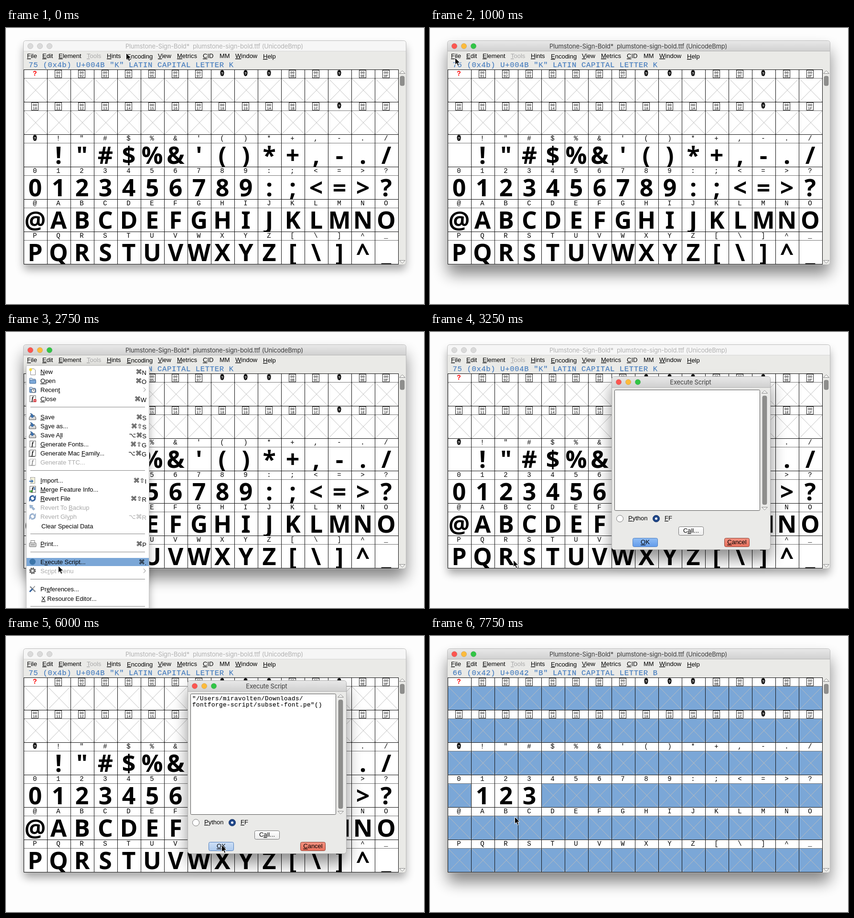
Write an HTML page that moves like this. It is 875 px wide and 579 px high and loops after 8000 ms.

```html
<!DOCTYPE html>
<html lang="en">
<head>
<meta charset="utf-8">
<title>Font subset demo</title>
<style>
html, body { margin: 0; width: 100%; height: 100%; overflow: hidden; background: #fdfdfd; }
svg { display: block; width: 875px; height: 579px; }
text { font: 13px "Liberation Sans", Arial, "DejaVu Sans", sans-serif; white-space: pre; }
.title { font: 13px Inter, Roboto, sans-serif; letter-spacing: -.18px; text-anchor: middle; }
.mono { font-family: "Liberation Mono", monospace; }
.label { font-size: 14px; text-anchor: middle; }
.hex { font-size: 7.5px; text-anchor: middle; }
.status { font-size: 15.5px; letter-spacing: .68px; fill: #4a7fbf; stroke: #4a7fbf; stroke-width: .25px; }
.script { font-size: 12.5px; letter-spacing: .5px; stroke: #000; stroke-width: .15px; }
.glyph { font: 700 50px "Noto Sans", "Open Sans", sans-serif; text-anchor: middle; }
.mid { text-anchor: middle; }
.key { text-anchor: end; }
.u { text-decoration: underline; }
</style>
</head>
<body>
<svg id="stage" viewBox="0 0 875 579">
  <defs>
    <linearGradient id="bar" x2="0" y2="1"><stop stop-color="#e8e8e8"/><stop offset="1" stop-color="#d0d0d0"/></linearGradient>
    <linearGradient id="white" x2="0" y2="1"><stop stop-color="#fff"/><stop offset="1" stop-color="#ececec"/></linearGradient>
    <linearGradient id="blue" x2="0" y2="1"><stop stop-color="#8fbdf5"/><stop offset="1" stop-color="#639bea"/></linearGradient>
    <linearGradient id="pale" x2="0" y2="1"><stop stop-color="#cfe0f5"/><stop offset="1" stop-color="#adcaee"/></linearGradient>
    <linearGradient id="red" x2="0" y2="1"><stop stop-color="#f39180"/><stop offset="1" stop-color="#e8705c"/></linearGradient>
    <filter id="soft" x="-20%" y="-20%" width="140%" height="150%"><feGaussianBlur stdDeviation="9"/></filter>
    <filter id="wide" x="-20%" y="-20%" width="140%" height="150%"><feGaussianBlur stdDeviation="16"/></filter>
  </defs>
</svg>
<script>
const stage = document.getElementById("stage");

function el(parent, tag, attrs = {}, text) {
  const node = document.createElementNS("http://www.w3.org/2000/svg", tag);
  for (const k in attrs) node.setAttribute(k, attrs[k]);
  if (text !== undefined) node.textContent = text;
  return parent.appendChild(node);
}
const group = (parent, attrs) => el(parent, "g", attrs);
const rect = (p, x, y, width, height, fill, more) => el(p, "rect", { x, y, width, height, fill, ...more });
const path = (p, d, more) => el(p, "path", { d, fill: "none", ...more });
const dot = (p, cx, cy, r, fill, more) => el(p, "circle", { cx, cy, r, fill, ...more });
const show = (node, on) => node.setAttribute("display", on ? "inline" : "none");

// "_" marks the underlined access key
function caption(p, x, y, s, more) {
  const t = el(p, "text", { x, y, ...more });
  const i = s.indexOf("_");
  if (i < 0) { t.textContent = s; return t; }
  el(t, "tspan", {}, s.slice(0, i));
  el(t, "tspan", { class: "u" }, s[i + 1]);
  el(t, "tspan", {}, s.slice(i + 2));
  return t;
}

function lights(p, x, y, colors) {
  colors.forEach((c, i) => dot(p, x + i * 20, y, 5.7, c, { stroke: "#000", "stroke-opacity": .12 }));
}
const LIT = ["#fc5650", "#fdbb3c", "#32c546"], DIM = ["#dadada", "#dadada", "#dadada"];

function scroller(p, x, top, bottom, thumbTop, thumbEnd) {
  const line = { stroke: "#8b8b8b", fill: "#f4f4f2" };
  path(p, `M${x - 6} ${top + 6}h12l-6 -6z`, line);
  path(p, `M${x - 6} ${bottom - 6}h12l-6 6z`, line);
  rect(p, x - 4.5, thumbTop, 9, thumbEnd - thumbTop, "#8e8e8c", { rx: 3, stroke: "#7b7b7b", "stroke-width": .6 });
}

// Main window
const HEADING = "Plumstone-Sign-Bold*  plumstone-sign-bold.ttf (UnicodeBmp)";
function frame(active) {
  const g = group(stage);
  if (active) rect(g, 37, 47, 800, 469, "#000", { rx: 6, opacity: .48, filter: "url(#wide)" });
  else rect(g, 37, 38, 800, 469, "#000", { rx: 6, opacity: .34, filter: "url(#soft)" });
  rect(g, 36.5, 26.5, 801, 470, "#eaeae7", { rx: 5, stroke: "#bdbdbd" });
  path(g, "M37 49V32q0 -5 5 -5H832q5 0 5 5V49z", { fill: active ? "url(#bar)" : "#f6f6f6" });
  path(g, "M37 48.5H837", { stroke: active ? "#b4b4b4" : "#d6d6d6" });
  lights(g, 51, 38, active ? LIT : DIM);
  el(g, "text", { x: 436, y: 43, class: "title", fill: active ? "#3c3c3c" : "#b2b2b2" }, HEADING);
  return g;
}
const idle = frame(false), active = frame(true);

const content = group(stage);
[["_File", 44], ["_Edit", 76], ["_Element", 110], ["_Tools", 169], ["_Hints", 211], ["_Encoding", 253, 1],
 ["_View", 318], ["_Metrics", 358], ["_CID", 412], ["MM", 447], ["_Window", 480], ["_Help", 538, 1]]
  .forEach(([s, x, low = 0]) => caption(content, x, 63 + low, s, { fill: s === "_Tools" ? "#a9a9a9" : "#000" }));
const status = el(content, "text", { x: 47.5, y: 82, class: "mono status" });

const COL = 49, ROW = 68, LEFT = 37.5, TOP = 87.5;
rect(content, 38, 88, 783, 407, "#fff");
const full = group(content), cut = group(content), labels = group(content);
const cross = (p, x, y) => path(p, `M${x} ${y}l49 50M${x + 49} ${y}l-49 50`, { stroke: "#bdbdbd" });

function unknown(p, x, y) {
  path(p, `M${x} ${y - 6.5}l3.2 1.5 1 4.5 -1.2 5.5 -3 1.8 -3 -1.8 -1.2 -5.5 1 -4.5z`, { fill: "#111" });
  el(p, "text", { x, y: y + 3, class: "mid", fill: "#fff", style: "font-size:8px;font-weight:700" }, "?");
}

function label(code, x, y) {
  if (code === 0) {
    el(labels, "text", { x, y: y + 12.5, class: "mono label", fill: "#f00", "font-weight": 700, style: "font-weight:700" }, "?");
  } else if ([8, 9, 10, 13, 29, 32].includes(code)) {
    unknown(labels, x, y + 7);
  } else if (code < 32) {
    rect(labels, x - 7, y + 1, 14, 16, "#fff", { stroke: "#222" });
    el(labels, "text", { x, y: y + 8, class: "mono hex" }, "00");
    el(labels, "text", { x, y: y + 15.5, class: "mono hex" }, code.toString(16).toUpperCase().padStart(2, "0"));
  } else {
    el(labels, "text", { x, y: y + 12.5, class: "mono label" }, String.fromCharCode(code));
  }
}

for (let code = 0; code < 96; code++) {
  const x = LEFT + code % 16 * COL, y = TOP + (code >> 4) * ROW, ch = String.fromCharCode(code);
  label(code, x + 23, y);
  const clip = el(stage.querySelector("defs"), "clipPath", { id: "c" + code });
  rect(clip, x, y + 18, COL, 50);
  const glyph = p => el(group(p, { "clip-path": `url(#c${code})` }), "text", { x: x + 23.5, y: y + 61, class: "glyph" }, ch);
  if (code < 32) cross(full, x, y + 18);
  else if (code > 32) glyph(full);
  if ("123".includes(ch)) glyph(cut);
  else {
    rect(cut, x, y + 18, COL, 50, "#7ba7d7");
    cross(cut, x, y + 18);
  }
}
for (let r = 0; r < 6; r++) path(content, `M37 ${TOP + 18 + r * ROW}H821`, { stroke: "#777" });
for (let r = 0; r < 7; r++) path(content, `M37 ${TOP + r * ROW}H822`, { stroke: "#111" });
for (let c = 0; c < 17; c++) path(content, `M${LEFT + c * COL} 87V496`, { stroke: "#111" });
scroller(content, 829.5, 89.5, 493.5, 101, 121);

// File menu
const icons = {
  page(g) {
    path(g, "M-4 -6h7l3 3v10h-10z", { fill: "#fff", stroke: "#888" });
    dot(g, -4, -4, 3, "#f3dc45");
  },
  folder(g) {
    path(g, "M-6 5v-10h5l1 2h6v8z", { fill: "#dbe7f5", stroke: "#3c6595" });
    rect(g, -6, -1, 13, 7, "#7da9d9", { rx: 1, stroke: "#3c6595" });
  },
  recent(g) {
    icons.folder(g);
    dot(g, 2, 2, 4, "#fff", { stroke: "#555" });
    path(g, "M2 -1V2H4", { stroke: "#555" });
  },
  font(g) {
    rect(g, -5.5, -6.5, 12, 13, "#fff", { stroke: "#666" });
    el(g, "text", { x: 0, y: 4, class: "mid", style: "font:italic 700 12px 'Liberation Serif',serif" }, "f");
  },
  close(g) {
    icons.font(g);
    rect(g, 2, 1, 6, 6, "#d3222a", { rx: 1 });
    path(g, "M3.5 2.5l3 3m0 -3l-3 3", { stroke: "#fff" });
  },
  fonts(g) {
    rect(g, -7.5, -4.5, 12, 12, "#fff", { stroke: "#666" });
    icons.font(g);
  },
  save(g) {
    path(g, "M-7 2l3 -5h8l3 5v4h-14z", { fill: "#d8d8d8", stroke: "#555" });
    path(g, "M-5 -7q6 0 6 5h3l-4.500 4 -4.500 -4h3q0 -3 -3 -5z", { fill: "#3d74b5", stroke: "#24507f", "stroke-width": .7 });
  },
  load(g) {
    path(g, "M-4 -6h9v13h-9z", { fill: "#f4f1da", stroke: "#777", "stroke-dasharray": "2 1" });
    path(g, "M-7 1h5v-3l4 4 -4 4v-3h-5z", { fill: "#3d74b5" });
  },
  merge(g) {
    icons.font(g);
    path(g, "M-7 3h4v-2l4 3 -4 3v-2h-4z", { fill: "#3fa535" });
    path(g, "M2 -3h4m-4 3h4", { stroke: "#3d74b5", "stroke-width": 2 });
  },
  revert(g) {
    path(g, "M-5 1a5 5 0 0 1 8 -5M5 -1a5 5 0 0 1 -8 5", { stroke: "#2f5f9d", "stroke-width": 3 });
    path(g, "M1 -1h6v-6zM-1 1h-6v6z", { fill: "#2f5f9d" });
  },
  back(g) {
    path(g, "M-6 -5l7 1 -2 2 6 5 -3 3 -5 -6 -2 2z", { fill: "#3d74b5", stroke: "#24507f" });
  },
  print(g) {
    rect(g, -3.500, -6.5, 8, 6, "#fff", { stroke: "#777" });
    rect(g, -6.5, -1.5, 14, 8, "#ddd", { rx: 1, stroke: "#666" });
    path(g, "M-4 2.500h9", { stroke: "#555" });
  },
  disc(g) { dot(g, 0, 0, 6.5, "#3c75a9"); },
  gear(g) {
    dot(g, 0, 0, 5.5, "#999", { stroke: "#555", "stroke-width": 3, "stroke-dasharray": "2.300 2" });
    dot(g, 0, 0, 4.500, "#999", { stroke: "#555" });
    dot(g, 0, 0, 2, "#fff");
  },
  tools(g) {
    path(g, "M-5 -5L6 6", { stroke: "#8a8f96", "stroke-width": 2.5 });
    path(g, "M5 -6L0 0", { stroke: "#888", "stroke-width": 1.5 });
    path(g, "M0 0L-6 6", { stroke: "#2f5f9d", "stroke-width": 3 });
  }
};
const ITEMS = [
  [83, "_New", "⌘N", "page"], [102, "_Open", "⌘O", "folder"], [121, "Recen_t", ">", "recent"], [140, "_Close", "⌘W", "close"],
  [178, "_Save", "⌘S", "save"], [197, "S_ave as...", "⌘⇧S", "save"], [216, "Save A_ll", "⌥⌘S", "save"],
  [235, "_Generate Fonts...", "⌘⇧G", "font"], [254, "Generate Mac _Family...", "⌥⌘G", "fonts"], [273, "Generate TTC...", "", "fonts", 1],
  [311, "_Import...", "⌘⇧I", "load"], [330, "_Merge Feature Info...", "", "merge"], [349, "_Revert File", "⌘⇧R", "revert"],
  [368, "Revert To _Backup", "", "back", 1], [387, "Revert Gl_yph", "⌥⌘R", "revert", 1], [407, "Clear Special Data", "", ""],
  [444, "_Print...", "⌘P", "print"], [482, "E_xecute Script...", "⌘.", "disc"], [501, "Sc_ript Menu", ">", "gear", 1],
  [539, "Pr_eferences...", "", "tools"], [559, "_X Resource Editor...", "", ""]
];
const menu = group(stage);
rect(menu, 43, 76, 256, 520, "#000", { opacity: .35, filter: "url(#soft)" });
rect(menu, 42.5, 70.5, 257, 540, "#fff", { rx: 2, stroke: "#c4c4c4" });
const mark = rect(menu, 43, 0, 256, 17, "#7ba7d7");
[157.5, 290.5, 423.5, 461.5, 518.5, 575.5].forEach(y => path(menu, `M51 ${y}H291`, { stroke: "#858585" }));
for (const [y, name, key, icon, off] of ITEMS) {
  const fill = off ? "#a9a9a9" : "#000";
  caption(menu, icon ? 72 : 74, y + 5, name, { fill });
  if (icon) icons[icon](group(menu, { transform: `translate(55.5 ${y})`, opacity: off && icon !== "gear" ? .5 : 1 }));
  if (key === ">") path(menu, `M288 ${y - 4.5}l4 4.500 -4 4.500`, { stroke: "#777" });
  else if (key) {
    const t = el(menu, "text", { x: 294, y: y + 5, class: "key", fill });
    el(t, "tspan", {}, key.slice(0, -1));
    el(t, "tspan", { dy: 1.5 }, key.slice(-1));
  }
}

// Script dialog
const dialog = group(stage);
rect(dialog, 381, 112, 332, 363, "#000", { rx: 6, opacity: .45, filter: "url(#wide)" });
rect(dialog, 380.5, 93.5, 332, 363, "#eaeae8", { rx: 5, stroke: "#b0b0b0" });
path(dialog, "M381 116V99q0 -5 5 -5H707q5 0 5 5V116z", { fill: "url(#bar)" });
path(dialog, "M381 116.5H712", { stroke: "#b4b4b4" });
lights(dialog, 395, 105, LIT);
el(dialog, "text", { x: 545.5, y: 110, class: "title", fill: "#3c3c3c" }, "Execute Script");
rect(dialog, 386.5, 121.5, 304, 253, "#fff", { rx: 2, stroke: "#555" });
scroller(dialog, 700.5, 122.5, 373.5, 134, 362);
const script = group(dialog);
["\"/Users/miravolten/Downloads/", "fontforge-script/subset-font.pe\"()"]
  .forEach((s, i) => el(script, "text", { x: 390, y: 135 + 13 * i, class: "mono script" }, s));
dot(dialog, 397.5, 391.5, 7, "#fff", { stroke: "#777" });
caption(dialog, 415, 395, "_Python");
dot(dialog, 473.5, 391.5, 7, "#20478a", { stroke: "#14305f" });
dot(dialog, 473.5, 391.5, 2.5, "#fff");
caption(dialog, 491, 395, "_FF");

function button(x, y, w, fill, stroke, s) {
  const box = rect(dialog, x + .5, y + .5, w, 18, fill, { rx: 3, stroke });
  caption(dialog, x + w / 2 + .5, y + 13, s, { class: "mid" });
  return box;
}
button(520, 408, 52, "url(#white)", "#777", "C_all...");
const ok = button(424, 432, 52, "url(#blue)", "#4f7fc0", "_OK");
button(616, 432, 52, "url(#red)", "#8a4438", "_Cancel");

const cursor = path(stage, "M0 0V14.5L3.3 11.500 5.700 17 8.200 15.900 5.900 10.500H10.400z",
  { fill: "#000", stroke: "#fff", "stroke-width": 1 });

// Pointer stops: time, x, y
const STOPS = [[0, 251, 52], [1000, 52, 62], [1250, 52, 62], [2500, 109, 490], [3000, 109, 490],
  [4000, 525, 410], [5000, 525, 410], [6000, 451, 438], [7250, 451, 438], [7750, 177, 379], [8000, 177, 379]];
function pointer(t) {
  const i = STOPS.findIndex(s => s[0] > t);
  const [t0, x0, y0] = STOPS[i - 1], [t1, x1, y1] = STOPS[i];
  const u = (t - t0) / (t1 - t0), k = u * u * (3 - 2 * u);
  return [x0 + (x1 - x0) * k, y0 + (y1 - y0) * k];
}

const LOOP = 8000, STEP = 250;
function draw(ms) {
  const t = Math.floor(ms % LOOP / STEP) * STEP;
  const within = (a, b) => t >= a && t < b;
  const [x, y] = pointer(t);
  const front = within(750, 3000) || t >= 7000;
  show(active, front);
  show(idle, !front);
  show(full, t < 7000);
  show(cut, t >= 7000);
  show(menu, within(1250, 3000));
  show(dialog, within(3000, 7000));
  show(script, t >= 4250);
  ok.setAttribute("fill", t >= 6000 ? "url(#pale)" : "url(#blue)");
  status.textContent = t >= 7750 ? '66 (0x42) U+0042 "B" LATIN CAPITAL LETTER B'
                                 : '75 (0x4b) U+004B "K" LATIN CAPITAL LETTER K';
  const hit = ITEMS.find(item => !item[4] && Math.abs(item[0] - y) <= 9.5);
  show(mark, hit);
  if (hit) mark.setAttribute("y", hit[0] - 8);
  cursor.setAttribute("transform", `translate(${Math.round(x) + .5} ${Math.round(y) + .5})`);
}

const start = performance.now();
function tick() {
  draw(performance.now() - start);
  requestAnimationFrame(tick);
}
tick();
</script>
</body>
</html>
```
